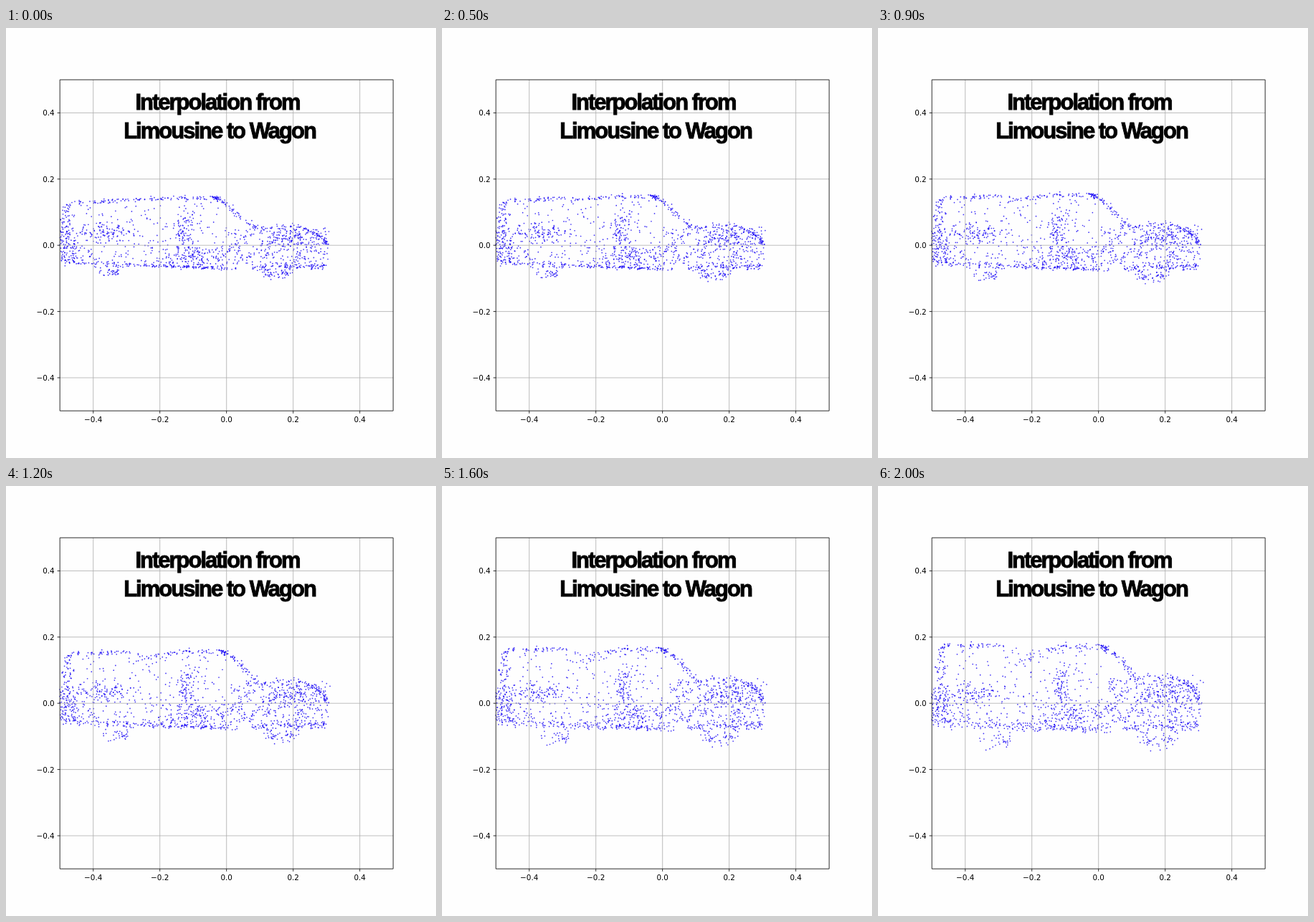
An HTML page with a canvas that plays this animation: 600 by 600 pixels, repeating every 2100 ms.

```html
<!DOCTYPE html>
<html lang="en">
<head>
<meta charset="utf-8">
<title>Interpolation from Limousine to Wagon</title>
<style>
  html, body { margin: 0; width: 100%; height: 100%; overflow: hidden; background: #fefefe; }
  canvas, svg { position: absolute; left: 0; top: 0; }
  .labels { font: 10.4px "DejaVu Sans", sans-serif; }
  .title { font: bold 31px "Liberation Sans", Arial, sans-serif; letter-spacing: -2px;
           text-anchor: middle; stroke: #000; stroke-width: .9px; }
</style>
</head>
<body>
<canvas id="cloud" width="600" height="600"></canvas>
<svg id="axes" width="600" height="600" viewBox="0 0 600 600"></svg>
<script>
const LEFT = 75.2, TOP = 72.2, WIDTH = 465, HEIGHT = 462;
const STEP_MS = 100, STEPS = 21;

// Axes, grid, tick labels and title
function drawAxes() {
  const right = LEFT + WIDTH, bottom = TOP + HEIGHT;
  let grid = '', ticks = '', labels = '';
  for (const v of [-0.4, -0.2, 0, 0.2, 0.4]) {
    const x = LEFT + (v + 0.5) * WIDTH, y = TOP + (0.5 - v) * HEIGHT;
    const label = v.toFixed(1).replace('-', '\u2212');
    grid += `M${x} ${TOP}V${bottom}M${LEFT} ${y}H${right}`;
    ticks += `M${x} ${bottom}v3.6M${LEFT} ${y}h-3.6`;
    labels += `<text x="${x}" y="549.8" text-anchor="middle">${label}</text>` +
              `<text x="67.7" y="${y + 3.9}" text-anchor="end">${label}</text>`;
  }
  document.getElementById('axes').innerHTML =
    `<path d="${grid}" stroke="#b0b0b0" stroke-width=".83"/>
     <path d="${ticks}M${LEFT} ${TOP}H${right}V${bottom}H${LEFT}Z" fill="none" stroke="#000" stroke-width=".83"/>
     <g class="labels">${labels}</g>
     <g class="title"><text x="295" y="114">Interpolation from</text><text x="298" y="153.5">Limousine to Wagon</text></g>`;
}

let seed = 20417;
function random() {
  seed = (seed + 0x6D2B79F5) | 0;
  let r = Math.imul(seed ^ (seed >>> 15), 1 | seed);
  r = (r + Math.imul(r ^ (r >>> 7), 61 | r)) ^ r;
  return ((r ^ (r >>> 14)) >>> 0) / 4294967296;
}
const mix = (a, b, k) => a + (b - a) * k;
const noise = size => (random() + random() + random() - 1.5) * size;

// Shapes turn two unit random numbers into a place
const box = ([x0, y0, x1, y1], u, v) => [mix(x0, x1, u), mix(y0, y1, v)];
const blob = ([x, y, sx, sy], u, v) => {
  const r = Math.sqrt(-2 * Math.log(1 - u * 0.95)), a = v * 2 * Math.PI;
  return [x + sx * r * Math.cos(a), y + sy * r * Math.sin(a)];
};
const wheel = ([x, y, rx, ry], u, v) => {
  const r = Math.sqrt(0.15 + 0.85 * u), a = v * Math.PI;
  return [x + rx * r * Math.cos(a), y + ry * r * Math.sin(a)];
};
const path = (p, u) => {
  const s = u * (p.length / 2 - 1), i = Math.floor(s) * 2;
  return [mix(p[i], p[i + 2], s % 1), mix(p[i + 1], p[i + 3], s % 1)];
};

const dots = [];
function add(count, shape, from, to, jitter = 2, drift = 3) {
  while (count--) {
    const u = random(), v = random();
    const [ax, ay] = shape(from, u, v), [bx, by] = shape(to, u, v);
    const dx = noise(jitter), dy = noise(jitter);
    dots.push([ax + dx, ay + dy, bx + dx + noise(drift), by + dy + noise(drift)]);
  }
}

// Roof, windscreen and bonnet
add(52, path, [80, 248, 110, 243, 140, 241, 175, 239], [87, 226, 103, 222, 135, 222, 180, 223], 3, 2);
add(22, path, [175, 239, 215, 238], [185, 236, 240, 234], 3, 14);
add(72, path, [215, 238, 250, 237, 290, 236.5, 300, 240], [238, 229, 262, 223, 310, 223, 324, 230], 3, 2.5);
add(42, path, [300, 240, 312, 250, 325, 263, 345, 276], [324, 230, 338, 242, 350, 256, 358, 267], 4);
add(70, path, [345, 277, 380, 279, 405, 276, 428, 285, 444, 295, 449, 303],
              [322, 272, 362, 268, 405, 266, 428, 273, 444, 287, 450, 307], 3);
// Sills
add(50, path, [76, 323, 120, 326, 170, 331], [76, 328, 120, 329, 170, 334], 5, 5);
add(115, path, [168, 330, 245, 333, 320, 336], [160, 333, 238, 337, 322, 340], 2, 5);
add(75, path, [345, 334, 400, 333, 448, 332], [345, 338, 400, 336, 448, 333], 4, 4);
// Rear end
add(45, box, [76, 250, 90, 300], [81, 228, 93, 300]);
add(85, box, [75, 278, 98, 328], [74, 282, 98, 330], 3, 5);
// Cabin
add(110, box, [90, 244, 300, 300], [92, 228, 318, 300], 2, 8);
add(165, box, [80, 298, 345, 330], [80, 298, 355, 334], 2, 8);
add(65, box, [306, 276, 352, 328], [318, 270, 360, 332], 3, 6);
add(100, blob, [142, 285, 18, 8], [134, 290, 20, 9], 2, 6);
add(80, blob, [247, 280, 7, 19], [255, 276, 6, 21]);
add(125, blob, [265, 319, 28, 8], [275, 319, 32, 10], 2, 6);
// Front end
add(270, box, [352, 280, 448, 333], [357, 272, 449, 335], 3, 6);
add(75, blob, [398, 291, 16, 8], [402, 287, 18, 11], 2, 5);
// Wheels
add(38, wheel, [144, 331, 22, 16], [164, 335, 33, 33], 3, 3);
add(58, wheel, [379, 334, 26, 17], [391, 337, 33, 35], 3, 3);

const ctx = document.getElementById('cloud').getContext('2d');
ctx.beginPath();
ctx.rect(LEFT - 0.5, TOP, WIDTH, HEIGHT);
ctx.clip();
ctx.fillStyle = 'rgba(24, 8, 246, .84)';

function frame(now) {
  const p = Math.floor(now / STEP_MS) % STEPS / (STEPS - 1);
  const k = 0.45 * p + 0.55 * p * p;
  ctx.clearRect(0, 0, 600, 600);
  for (const [ax, ay, bx, by] of dots) {
    ctx.beginPath();
    ctx.arc(mix(ax, bx, k), mix(ay, by, k), 0.85, 0, 7);
    ctx.fill();
  }
  requestAnimationFrame(t => frame(Math.max(0, t - start)));
}

drawAxes();
const start = performance.now();
frame(0);
</script>
</body>
</html>
```
